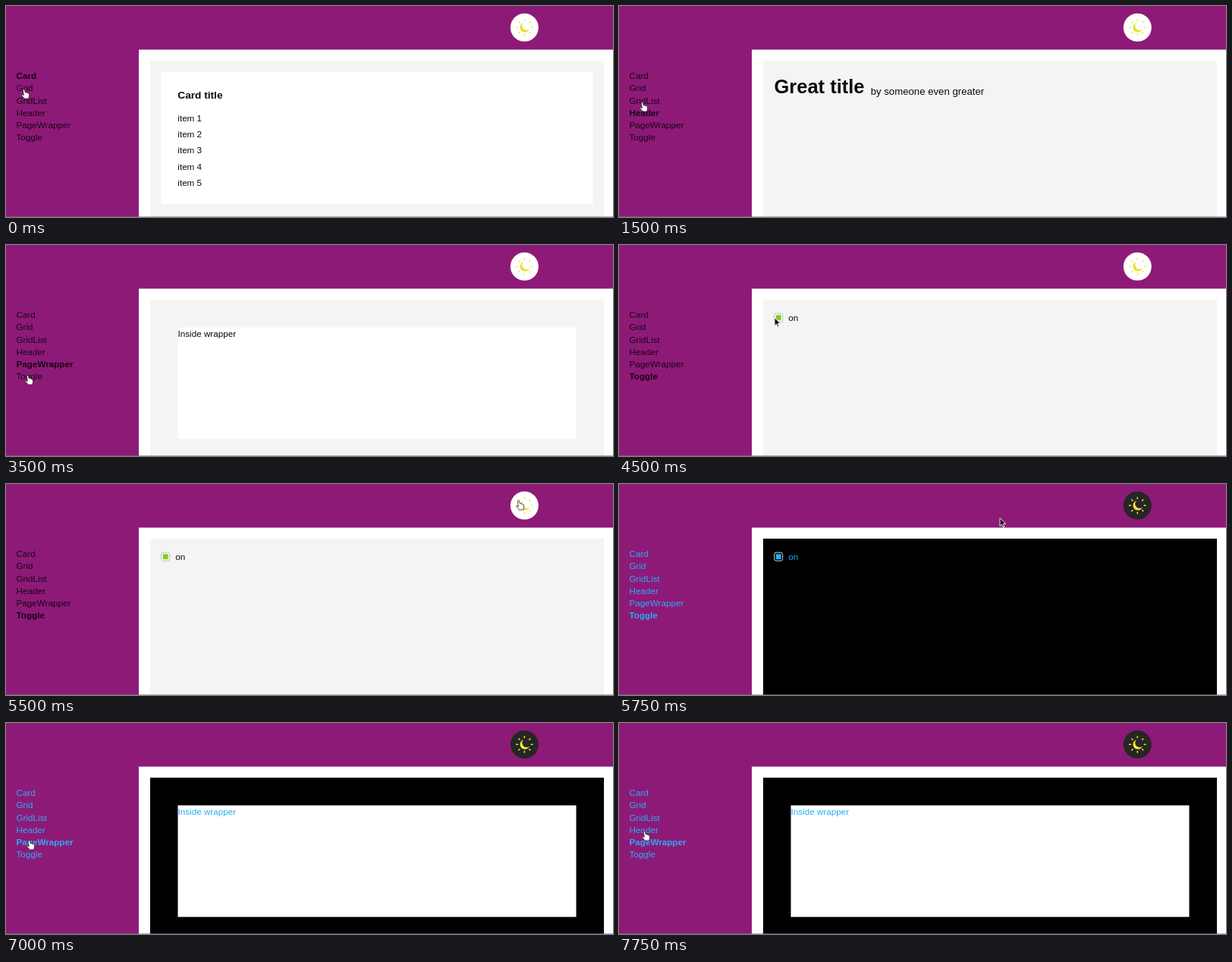
Write an HTML page that moves like this. It is 800x278 px and loops after 8 s.

```html
<!DOCTYPE html>
<html lang="en">
<head>
<meta charset="utf-8">
<title>Component viewer</title>
<style>
html, body { margin: 0; width: 100%; height: 100%; overflow: hidden; background: #8e1a78; }
svg { display: block; width: 800px; height: 278px; font: 11.68px "Liberation Sans", Arial, sans-serif;
  --ink: #0b0b0b; --nav: #190515; --panel: #f4f4f4; --disc: #fff; --moon: #e6e02c; --ray: #efe65a;
  --fill: #80cc20; --gap: #fff; --rim: #bcbcbc; }
svg.dark { --ink: #22aef5; --nav: #2eaaf4; --panel: #000; --disc: #262626; --moon: #f4ea35; --ray: #f4ea35;
  --fill: #22aef5; --gap: #000; --rim: #b4dcf2; }
text { fill: var(--ink); white-space: pre; }
#nav text { fill: var(--nav); }
.bold { font-weight: bold; }
.page { display: none; }
.page.open { display: inline; }
</style>
</head>
<body>
<svg id="stage" viewBox="0 0 800 278">
  <rect width="800" height="278" fill="#8e1a78"/>
  <rect x="175" y="57.5" width="625" height="221" fill="#fff"/>
  <rect x="190" y="72" width="598" height="206" fill="var(--panel)"/>
  <g id="nav"></g>

  <g class="page" id="Card">
    <rect x="204.5" y="87" width="569" height="174" fill="#fff"/>
    <text class="bold" x="226.3" y="122" font-size="13.67">Card title</text>
  </g>
  <g class="page" id="Header">
    <text class="bold" x="204.5" y="115.4" font-size="25.5">Great title</text>
    <text x="331.7" y="116.8" font-size="13.2">by someone even greater</text>
  </g>
  <g class="page" id="PageWrapper">
    <rect x="226.5" y="108.5" width="525" height="147" fill="#fff"/>
    <text x="226.5" y="121">Inside wrapper</text>
  </g>
  <g class="page" id="Toggle">
    <rect x="204.7" y="90.2" width="11" height="11" rx="2.5" fill="var(--gap)" stroke="var(--rim)"/>
    <rect x="206.7" y="92.2" width="7" height="7" rx=".8" fill="var(--fill)"/>
    <text x="223.3" y="99.8">on</text>
  </g>

  <g transform="translate(683.3 28.3)">
    <circle r="18.5" fill="var(--disc)"/>
    <path d="M-1.3-6.2A6.4 6.4 0 1 0 6.6 2.1A5.6 5.6 0 0 1-1.3-6.2Z" fill="var(--moon)"/>
    <g id="rays" stroke="var(--ray)" stroke-width="1.4" stroke-linecap="round"></g>
  </g>

  <rect y="277" width="800" height="1" fill="#777" opacity=".55"/>
  <g id="cursor" stroke-linejoin="round">
    <path id="hand" fill="#fff" stroke="#222" stroke-width=".8"
      d="M2.3 1.6Q2.6.5 3.6.8Q4.3 1 4.6 2L5.5 5Q6.4 4.3 7.2 5.2Q8.2 4.7 8.8 5.7Q10.2 5.5 10.4 7L10.6 9.5L9.6 13H4.4L1 9.2Q.2 7.9 1.3 7.6L3.4 8.6Z"/>
    <path id="arrow" fill="#111" stroke="#fff" stroke-width=".9"
      d="M1 .8V11.4L3.5 9.2L5.2 13L6.9 12.2L5.3 8.5L8.6 8.2Z"/>
  </g>
</svg>
<script>
const TICK = 250, LOOP = 8000, DARK_FROM = 23;
const $ = id => document.getElementById(id);

// [tick, page]
const pages = [[0, "Card"], [4, "Header"], [12, "PageWrapper"], [16, "Toggle"], [28, "PageWrapper"]];

// [tick, x, y] of the pointer's box
const path = [
  [0, 20, 109], [1, 20, 111], [4, 27, 138], [6, 27, 126], [9, 26, 130], [11, 27, 152],
  [14, 25, 171], [16, 25, 172], [18, 204, 95], [19, 215, 93], [20, 645, 37], [21, 670, 23],
  [22, 672, 21], [23, 501, 44], [24, 180, 104], [25, 28, 152], [26, 27, 154], [28, 27, 154],
  [30, 30, 142], [31, 30, 142]
];

function addText(parent, label, x, y) {
  const el = document.createElementNS("http://www.w3.org/2000/svg", "text");
  el.textContent = label;
  el.setAttribute("x", x);
  el.setAttribute("y", y);
  return parent.appendChild(el);
}

const links = ["Card", "Grid", "GridList", "Header", "PageWrapper", "Toggle"]
  .map((name, i) => addText($("nav"), name, 13.5, 96.3 + i * 16.17));
for (let i = 0; i < 5; i++) addText($("Card"), `item ${i + 1}`, 226.3, 151.6 + i * 21.4);

for (let i = 0; i < 8; i++) {
  const ray = document.createElementNS("http://www.w3.org/2000/svg", "path");
  ray.setAttribute("d", "M0-8.9V-10.7");
  ray.setAttribute("transform", `rotate(${i * 45})`);
  $("rays").append(ray);
}

function pointerAt(tick) {
  const i = path.findLastIndex(key => key[0] <= tick);
  const a = path[i], b = path[i + 1] || a;
  const k = b === a ? 0 : (tick - a[0]) / (b[0] - a[0]);
  return [a[1] + (b[1] - a[1]) * k, a[2] + (b[2] - a[2]) * k];
}

function draw(tick) {
  const page = pages.findLast(row => row[0] <= tick)[1];
  const [x, y] = pointerAt(tick);
  const overLink = x < 90 || x > 660;
  $("stage").classList.toggle("dark", tick >= DARK_FROM);
  document.querySelectorAll(".page").forEach(el => el.classList.toggle("open", el.id === page));
  links.forEach(el => el.classList.toggle("bold", el.textContent === page));
  $("cursor").setAttribute("transform", `translate(${x} ${y})`);
  $("hand").style.display = overLink ? "" : "none";
  $("arrow").style.display = overLink ? "none" : "";
}

let shown = -1;
function frame() {
  const tick = Math.floor(performance.now() % LOOP / TICK);
  if (tick !== shown) draw(shown = tick);
  requestAnimationFrame(frame);
}
frame();
</script>
</body>
</html>
```
